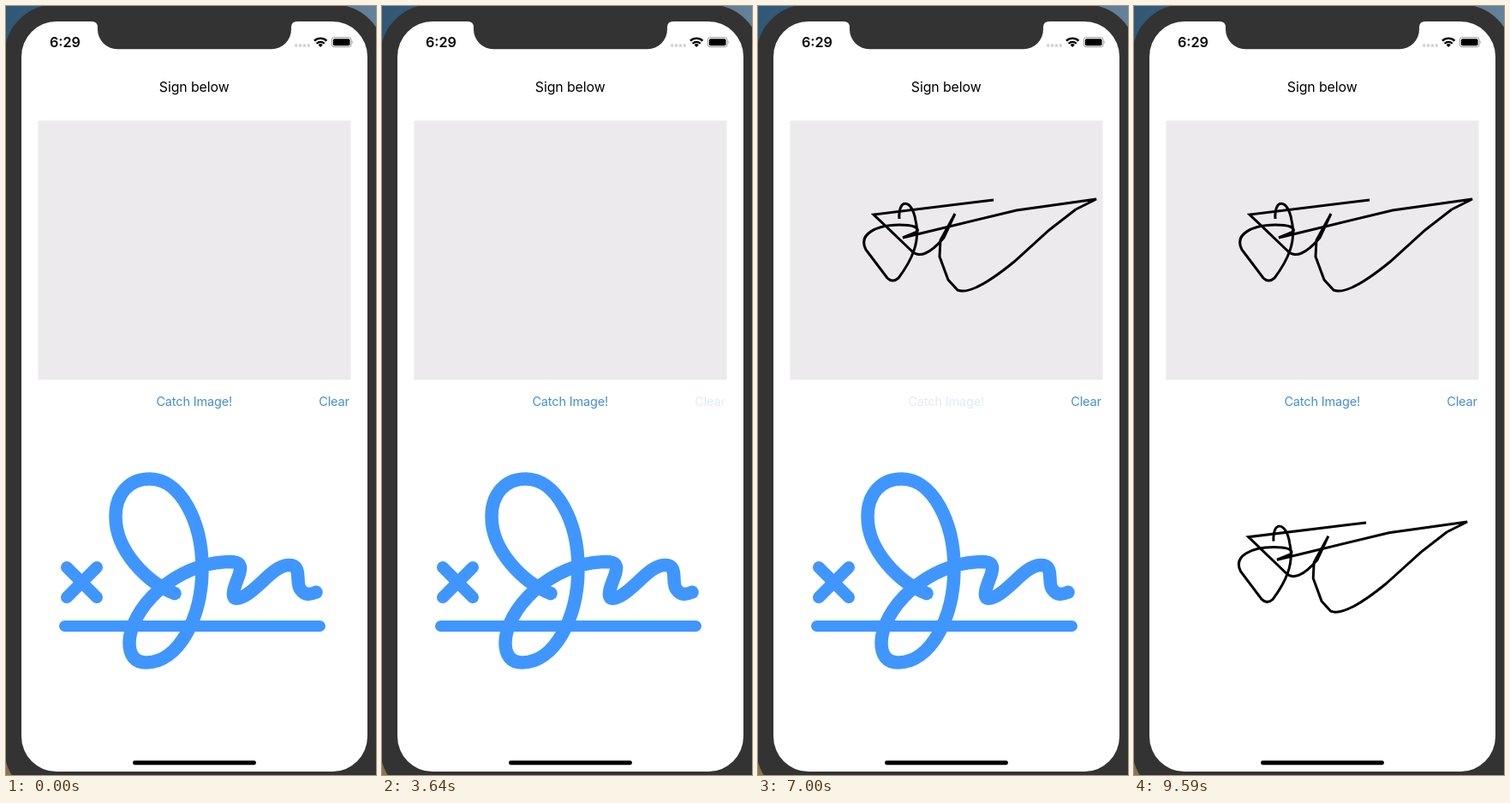
An HTML page for the animation above (9730 ms loop, 432 by 896 pixels).

```html
<!DOCTYPE html>
<html lang="en">
<head>
<meta charset="utf-8">
<title>Sign below</title>
<style>
  html, body { margin: 0; height: 100%; overflow: hidden; }
  svg { display: block; width: 100vw; height: 100vh; font-family: Inter, Roboto, sans-serif; }
  .line { fill: none; stroke-linecap: round; stroke-linejoin: round; }
  .ink { fill: none; stroke: #000; stroke-width: 3; }
  .button { font-size: 14.5px; letter-spacing: -.15px; fill: #448fcd; }
</style>
</head>
<body>
<svg viewBox="0 0 432 896">
  <defs>
    <linearGradient id="wallpaper" x2="0" y2="1">
      <stop offset="0" stop-color="#2f5877"/>
      <stop offset="1" stop-color="#8b7449"/>
    </linearGradient>
    <linearGradient id="haze">
      <stop offset="0" stop-color="#fff" stop-opacity="0"/>
      <stop offset="1" stop-color="#fff" stop-opacity=".25"/>
    </linearGradient>
  </defs>

  <!-- Phone -->
  <rect width="432" height="896" fill="url(#wallpaper)"/>
  <rect width="432" height="896" fill="url(#haze)"/>
  <rect x="-2" y="-2" width="444" height="927" rx="60" fill="#333"/>
  <rect x="18" y="18" width="404" height="874" rx="41" fill="#fff"/>
  <path d="M100 17V18q7 0 7 7v2.3a23 23 0 0 0 23 23h180a23 23 0 0 0 23-23v-2.3q0-7 7-7v-1z" fill="#333"/>
  <rect x="148" y="879.3" width="144" height="4.9" rx="2.4"/>

  <!-- Status bar -->
  <text x="51" y="47.9" font-size="16.2" font-weight="600">6:29</text>
  <path class="line" d="M338.7 46h15" stroke="#d6d6d6" stroke-width="3.8" stroke-dasharray="0 4.9"/>
  <g fill="none" stroke="#000" stroke-width="2.3">
    <path d="M360 40.6a10.2 10.2 0 0 1 14.4 0M362.6 43.7a6.6 6.6 0 0 1 9.2 0"/>
    <path d="M367.2 48l-2.6-2.7a3.7 3.7 0 0 1 5.2 0z" fill="#000" stroke="none"/>
  </g>
  <rect x="380.2" y="36.7" width="23" height="11" rx="3" fill="none" stroke="#999"/>
  <rect x="381.8" y="38.2" width="19.8" height="8" rx="1.7"/>
  <path d="M404.4 40.3q1.6 1.9 0 3.8z" fill="#999"/>

  <!-- Content -->
  <text x="178.8" y="99.8" font-size="15.9" letter-spacing="-.1">Sign below</text>
  <rect x="37.5" y="133.5" width="365" height="302" fill="#eceaed"/>
  <text id="catch" class="button" x="175.4" y="465.5">Catch Image!</text>
  <text id="clear" class="button" x="365.2" y="465.5">Clear</text>

  <g id="first" class="ink">
    <path data-from="770" data-to="1400" d="M193 249Q202 235 222 235.5C247 237 243 247 222 255
      Q187 270 155 276C130 282 134 268 144 255Q158 235 187 219C209 211 210 229 190 247L115 319"/>
    <path data-from="1400" data-to="2240" d="M115 319Q205 257 300 245"/>
  </g>
  <g id="second" class="ink">
    <path data-from="4410" data-to="5180" d="M165 248C163 224 180 224 184 250C190 275 179 297 164 317
      Q157 323 151 317L126 284C116 265 140 255 165 255Q189 255 186 263L169 270L302 238L395 225L371 237"/>
    <path data-from="5180" data-to="5880" d="M371 237L340 261L299 298Q250 338 233 331L222 319L212 292
      L213 273L230 242L217 270Q192 299 179 285L135 243L275 226"/>
  </g>
  <use id="copy" href="#second" transform="translate(.8 379.8) scale(.983)"/>

  <g id="icon" class="line" stroke="#4096ff">
    <path stroke-width="14" d="M71 654l35 35M106 654l-35 35"/>
    <path stroke-width="13" d="M68.5 722.5h298"/>
    <path stroke-width="15.5" d="M197 684.5C165 672 128 635 128 595C128 568 144 551 168 551
      C203 551 229 600 229 655C229 715 200 765 164 765C150 765 144 756 144 742
      C144 705 195 648 262 647.5C281 648 272 662 268 674C262 690 266 694 279 687
      C297 677 312 652 330 651.5C347 651 337 672 344 680C349 687 355 686 362 683"/>
  </g>
</svg>

<script>
const LOOP = 9730, STEP = 70;
const CLEARED = 3570, CAUGHT = 7070;
const FADE_DELAY = 70, FADE = 490, PRESS = 140;

const byId = id => document.getElementById(id);
const clamp = v => Math.max(0, Math.min(1, v));
const show = (id, visible) => byId(id).style.display = visible ? "" : "none";

const strokes = [...document.querySelectorAll("[data-from]")].map(path => ({
  path, from: +path.dataset.from, to: +path.dataset.to, length: path.getTotalLength()
}));

// The pen uncovers each stroke at an even speed.
function drawStroke({ path, from, to, length }, t) {
  const progress = clamp((t - from) / (to - from));
  path.style.visibility = progress ? "visible" : "hidden";
  path.setAttribute("stroke-dasharray", `${progress * length} ${length + 1}`);
}

// A pressed button dims at once and fades back after it is released.
function buttonOpacity(t, released) {
  if (t < released - PRESS) return 1;
  return .17 + .83 * clamp((t - released - FADE_DELAY) / FADE);
}

function draw(now) {
  const t = Math.floor(now % LOOP / STEP) * STEP;
  strokes.forEach(stroke => drawStroke(stroke, t));
  byId("clear").setAttribute("opacity", buttonOpacity(t, CLEARED));
  byId("catch").setAttribute("opacity", buttonOpacity(t, CAUGHT));
  show("first", t < CLEARED);
  show("icon", t < CAUGHT);
  show("copy", t >= CAUGHT);
}

const began = performance.now();
(function tick() {
  draw(performance.now() - began);
  requestAnimationFrame(tick);
})();
</script>
</body>
</html>
```
